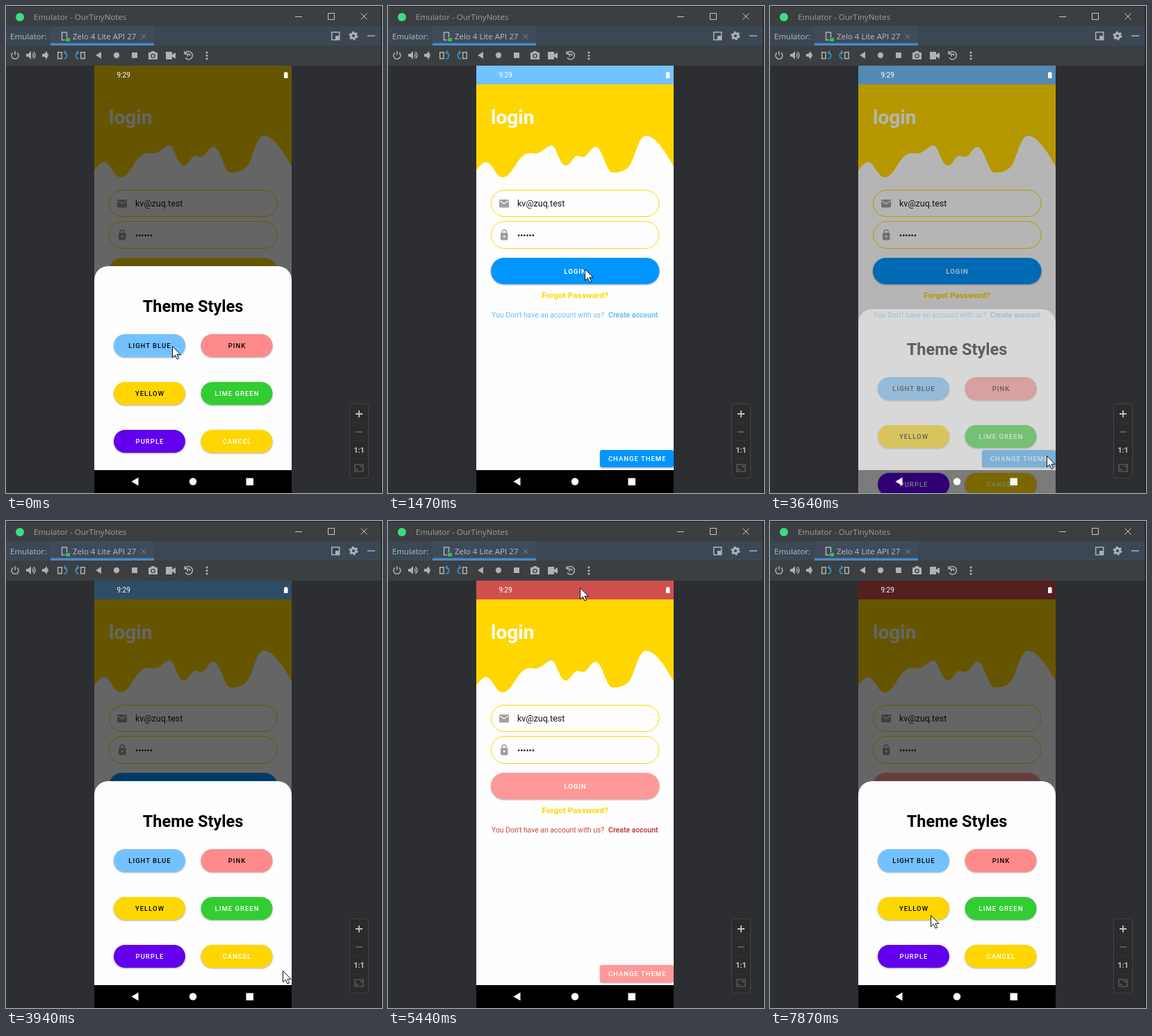
Recreate the animation shown at these times as an HTML page. Size 541 px wide and 702 px high, loop 8000 ms.

```html
<!DOCTYPE html>
<html lang="en">
<head>
<meta charset="utf-8">
<title>Theme switch</title>
<style>
html, body { margin: 0; width: 100%; height: 100%; overflow: hidden; background: #2d2e31; }
svg { display: block; width: 541px; height: 702px; }
text { font-family: Roboto, sans-serif; }
.ui { font: 11.5px "Open Sans", sans-serif; fill: #bbbdbf; }
.caps { font-size: 9.5px; font-weight: 500; letter-spacing: 1px; text-anchor: middle; }
.mid { text-anchor: middle; }
.bold { font-weight: 700; }
.icons { fill: #afb1b3; }
.line { fill: none; stroke: #afb1b3; stroke-width: 1.5; }
.blue { fill: none; stroke: #3592c4; stroke-width: 1.7; }
.raised { filter: drop-shadow(0 1px 1px rgba(0, 0, 0, .35)); }
.accent { fill: var(--accent); }
.link { fill: var(--link); }
</style>
</head>
<body>
<svg id="stage" viewBox="0 0 541 702">
  <defs>
    <clipPath id="phone"><rect x="127" y="86" width="284" height="616"/></clipPath>
    <clipPath id="button"><rect x="305" y="640" width="106" height="25" rx="3"/></clipPath>
  </defs>

  <!-- window frame -->
  <rect width="541" height="702" fill="#2d2e31"/>
  <rect width="541" height="86" fill="#3c3f41"/>
  <rect y="29" width="541" height="28" fill="#3b4754"/>
  <rect x="64" y="29" width="149" height="28" fill="#3f4b5a"/>
  <rect x="64" y="53.5" width="149" height="3.5" fill="#4a88c7"/>
  <rect width="541" height="1" fill="#242628"/>
  <rect x="539.5" width="1.5" height="702" fill="#1f2022"/>
  <circle cx="20" cy="16" r="6" fill="#3ddc84"/>
  <text class="ui" x="40" y="20" style="fill:#9c9fa1">Emulator - OurTinyNotes</text>
  <text class="ui" x="6" y="48">Emulator:</text>
  <text class="ui" x="96" y="48">Zelo 4 Lite API 27</text>
  <path d="M416 15.5h10M463.500 10.500h9v9h-9zM510.500 10.500l9 9m0-9l-9 9" fill="none" stroke="#c4c6c7" stroke-width="1"/>
  <path d="M194.500 40.500l7 7m0-7l-7 7" fill="none" stroke="#7c858e"/>
  <path class="line" d="M85 49h-4.500v-11h7v7"/>
  <rect x="86" y="46" width="6" height="5" fill="#3fb950"/>
  <rect class="line" x="468.700" y="37.700" width="11" height="11"/>
  <rect class="icons" x="474" y="43" width="6" height="6"/>
  <circle cx="500" cy="43" r="3.600" fill="none" stroke="#afb1b3" stroke-width="3"/>
  <circle cx="500" cy="43" r="5.600" fill="none" stroke="#afb1b3" stroke-width="2" stroke-dasharray="2.930"/>
  <path class="line" d="M520 43h11"/>

  <!-- toolbar -->
  <path class="line" d="M10 67.300a5 5 0 1 0 6 0M13 65v6"/>
  <g class="icons">
    <path id="speaker" d="M29 69h3l4-4v12l-4-4h-3z"/>
    <use href="#speaker" x="23"/>
    <path d="M137 66v10l-8-5z"/>
    <circle cx="159" cy="71" r="4.200"/>
    <rect x="181" y="67" width="8" height="8"/>
    <path d="M205 67h3l1.500-2h4l1.500 2h3v10h-13z"/>
    <path d="M230 66h9v4l5-3v9l-5-3v4h-9z"/>
    <circle cx="289" cy="67" r="1.600"/><circle cx="289" cy="71.500" r="1.600"/><circle cx="289" cy="76" r="1.600"/>
  </g>
  <circle cx="211.500" cy="72" r="2.600" fill="#afb1b3" stroke="#3c3f41" stroke-width="1.400"/>
  <path class="line" d="M38 68.500q2.500 2.500 0 5M39.500 66q5 5 0 10M59 68.500q2.500 2.500 0 5"/>
  <path class="line" d="M74.700 66.700h5.500v9h-5.500zM107.700 66.700h5.500v9h-5.500z"/>
  <path class="blue" d="M83 76c6 0 6-9 1-9m2-2.500l-2.500 2.500 2.500 2.500M105 76c-6 0-6-9-1-9m-2-2.500l2.500 2.500-2.500 2.500"/>
  <path class="line" d="M258 68a5.700 5.700 0 1 1 0 6.500M257 65v4h4M261 73v-3.500h3.500V72"/>

  <!-- zoom panel -->
  <rect x="494.500" y="573.500" width="27" height="107" rx="4" fill="#2b2b2c" stroke="#424446"/>
  <path d="M503 588h10m-5-5v10" stroke="#c0c2c4" stroke-width="1.800"/>
  <path d="M503 614h10" stroke="#68696b" stroke-width="1.500"/>
  <path d="M499 600.500h18M499 626.500h18M499 652.500h18" stroke="#353638"/>
  <text class="mid bold" x="508" y="643.500" font-size="11" fill="#c0c2c4">1:1</text>
  <path d="M502 661h12v10h-12zM504.500 668.500v-2m0 2h2.500M511.500 663.500v2m0-2h-2.500" fill="none" stroke="#68696b" stroke-width="1.200"/>

  <!-- phone -->
  <g clip-path="url(#phone)">
    <rect x="127" y="86" width="284" height="583" fill="#fefefe"/>
    <path fill="#ffd600" d="M127 112V237C132 231 136 225 141 225C150 225 155 247 165 247C180 247 186 212 204 212C210 212 212 214 218 211C226 207 230 201 235 201C243 201 246 230 256 230C263 230 266 216 273 216C277 216 279 219 283 217C289 214 292 203 299 203C308 203 314 240 323 240C334 240 338 238 344 234C355 226 359 187 371 187C385 187 399 210 411 231V112Z"/>
    <rect id="status" x="127" y="86" width="284" height="27"/>
    <text class="bold" x="148" y="169.500" font-size="28" fill="#fff">login</text>
    <g fill="none" stroke="#ffd600">
      <rect x="148.500" y="265.500" width="241.500" height="38" rx="19"/>
      <rect x="148.500" y="310.500" width="241.500" height="39" rx="19.500"/>
    </g>
    <rect x="160" y="279" width="14" height="11.500" rx="1.400" fill="#9e9e9e"/>
    <path d="M161 281l6 4 6-4" fill="none" stroke="#fefefe" stroke-width="1.300"/>
    <rect x="162" y="327" width="10.500" height="10.500" rx="1.400" fill="#9e9e9e"/>
    <path d="M164.200 328v-2.200a3 3 0 0 1 6 0v2.200" fill="none" stroke="#9e9e9e" stroke-width="1.400"/>
    <circle cx="167.200" cy="332.200" r="1.400" fill="#fefefe"/>
    <text x="186" y="289" font-size="12.500" fill="#161616">kv@zuq.test</text>
    <text x="186" y="335" font-size="12.300" fill="#161616">••••••</text>
    <rect class="accent raised" x="148" y="363" width="242.500" height="38" rx="19"/>
    <text class="caps" x="269.500" y="386" fill="#fff" style="font-weight:700">LOGIN</text>
    <text class="mid bold" x="269" y="421" font-size="11.800" fill="#ffd600">Forgot Password?</text>
    <text class="link" x="149" y="449" font-size="10.400">You Don't have an account with us?</text>
    <text class="link bold" x="317" y="449" font-size="10.500">Create account</text>
    <rect class="accent raised" x="305" y="640" width="106" height="25" rx="3"/>
    <g clip-path="url(#button)">
      <circle id="ripple" cx="359.500" cy="652" r="51" fill="#fff" opacity=".35"/>
    </g>
    <text class="caps" x="358.700" y="656" fill="#fff">CHANGE THEME</text>

    <rect id="dim" x="127" y="86" width="284" height="583"/>
    <rect x="127" y="669" width="284" height="33"/>
    <g id="sheet">
      <path d="M127 669V395a20 20 0 0 1 20-20h244a20 20 0 0 1 20 20v274z" fill="#fefefe"/>
      <text class="mid bold" x="269" y="441" font-size="23.500">Theme Styles</text>
    </g>

    <g fill="#fff">
      <text x="159.500" y="103" font-size="10">9:29</text>
      <path d="M400 96h1.500v-1h2.500v1h1.500v8h-5.500z"/>
      <path d="M190.500 679.500v12l-10-6z"/>
      <circle cx="269" cy="685.500" r="5.200"/>
      <rect x="345.500" y="680.500" width="10.500" height="10.500"/>
    </g>
  </g>

  <path id="cursor" d="M0 0V16.200L3.900 12.700L6.500 18.600L9 17.500L6.400 11.800H11.500Z" fill="#fff" stroke="#111" stroke-width="1"/>
</svg>

<script>
const LOOP = 8000;
const $ = id => document.getElementById(id);
const clamp = v => Math.max(0, Math.min(1, v));

const choices = [
  ['LIGHT BLUE', '#73c2ff', '#000'], ['PINK', '#ff8a8a', '#000'],
  ['YELLOW', '#ffd600', '#000'], ['LIME GREEN', '#32cd32', '#fff'],
  ['PURPLE', '#6200ee', '#fff'], ['CANCEL', '#ffd600', '#fff']
];
$('sheet').innerHTML += choices.map(([label, fill, ink], i) => {
  const x = 155 + (i % 2) * 125.5;
  const y = 473 + Math.floor(i / 2) * 69;
  return `<rect class="raised" x="${x}" y="${y}" width="103" height="33" rx="16.5" fill="${fill}"/>
    <text class="caps" x="${x + 52}" y="${y + 20}" fill="${ink}">${label}</text>`;
}).join('');

// start, status bar, buttons, links
const themes = [
  [0, '#ffd600', '#ffd600', '#ffd600'],
  [300, '#73c2ff', '#0095ff', '#68bef8'],
  [4800, '#d05050', '#ff9898', '#c94646']
];

// the sheet fades and slides for SLIDE ms after each start and each end
const SLIDE = 150;
const sheetSpans = [[-SLIDE, 190], [3440, 4690], [7120, LOOP]];
const pressSpans = [[3250, 3500], [6930, 7190]];

const rhythm = [
  [0, 1], [120, 2], [390, 5], [1080, 1], [1200, 7], [2130, 1], [2280, 3],
  [2710, 4], [3250, 1], [3370, 4], [3940, 3], [4330, 1], [4480, 7], [5440, 1],
  [5590, 7], [6550, 1], [6700, 3], [7060, 5], [7720, 1], [7870, 1], [LOOP, 1]
];

// time, x, y of the pointer tip
const path = [
  [0, 239, 490], [400, 239, 490], [660, 300, 200], [800, 340, 100],
  [940, 395, 120], [1080, 407, 240], [1330, 390, 375], [1600, 177, 382],
  [1860, 300, 442], [2130, 216, 452], [2280, 485, 650], [2420, 440, 667],
  [2710, 385, 630], [3000, 398, 648], [3940, 398, 648], [4330, 330, 490],
  [4760, 330, 490], [5440, 276, 96], [5590, 274, 110], [5860, 231, 370],
  [6130, 240, 440], [6400, 385, 445], [6550, 375, 555], [6820, 368, 648],
  [7330, 368, 648], [7720, 255, 579], [7870, 231, 568], [LOOP, 231, 568]
];

const indexAt = (list, t) => list.findLastIndex(item => item[0] <= t);

function snap(t) {
  const i = indexAt(rhythm, t);
  const [start, count] = rhythm[i];
  const step = (rhythm[i + 1][0] - start) / count;
  return start + Math.floor((t - start) / step) * step;
}

function pointer(t) {
  const i = indexAt(path, t);
  const [a, x, y] = path[i];
  const [b, x2, y2] = path[i + 1];
  const k = (t - a) / (b - a);
  return [x + (x2 - x) * k, y + (y2 - y) * k];
}

const sheetOpen = t => Math.max(...sheetSpans.map(([from, to]) =>
  clamp((t - from) / SLIDE) * clamp(1 - (t - to) / SLIDE)));

function draw(now) {
  const t = snap(now % LOOP);
  const [, status, accent, link] = themes[indexAt(themes, t)];
  const open = sheetOpen(t);
  const pressed = pressSpans.some(([from, to]) => t >= from && t < to);

  $('status').setAttribute('fill', status);
  $('stage').style.setProperty('--accent', accent);
  $('stage').style.setProperty('--link', link);
  $('dim').setAttribute('opacity', 0.6 * open);
  $('sheet').setAttribute('opacity', open);
  $('sheet').setAttribute('transform', `translate(0 ${(1 - open) * 120})`);
  $('ripple').setAttribute('visibility', pressed ? 'visible' : 'hidden');
  $('cursor').setAttribute('transform', `translate(${pointer(t).map(v => Math.round(v) + 0.5)})`);
}

const begin = performance.now();
function tick() {
  draw(performance.now() - begin);
  requestAnimationFrame(tick);
}
tick();
</script>
</body>
</html>
```
